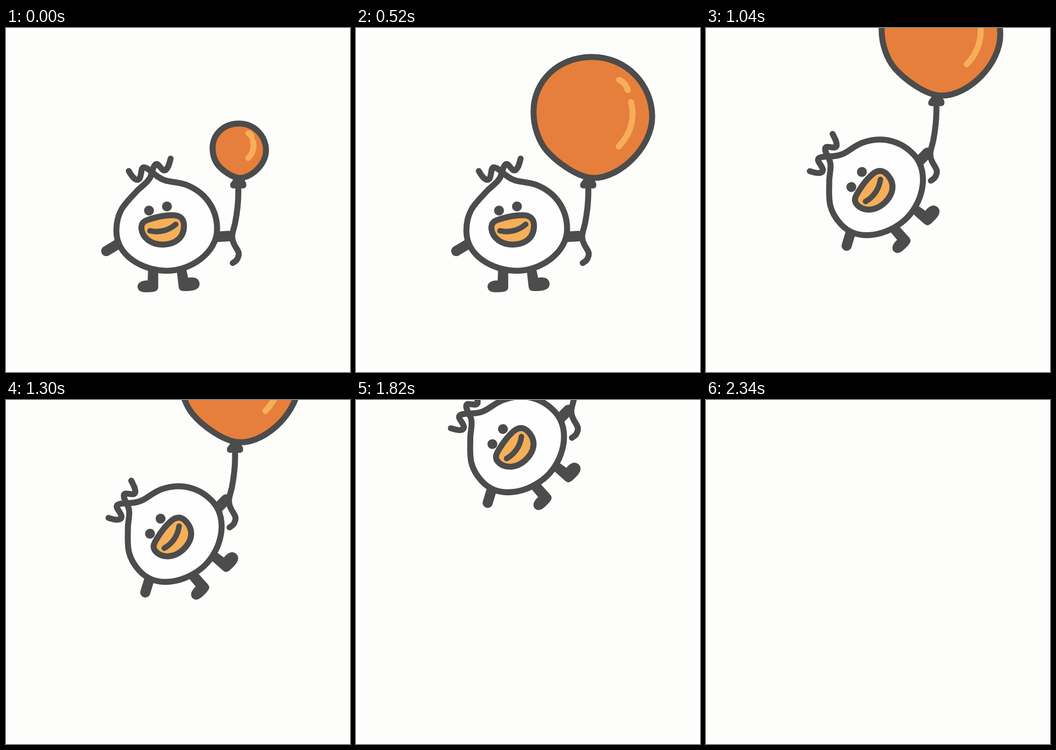
Recreate the animation shown at these times as an HTML page. Size 748x748 px, loop 2470 ms.

```html
<!DOCTYPE html>
<html>
<head>
<meta charset="utf-8">
<style>
  html, body { margin: 0; width: 100%; height: 100%; overflow: hidden; background: #fdfefc; }
  svg { display: block; width: 100%; height: 100%; }
  .line { fill: none; stroke: #4b4c4b; stroke-width: 13; stroke-linecap: round; stroke-linejoin: round; }
  .ink { fill: #4b4c4b; }
  .shine { stroke: #f6ae58; }
  .even { vector-effect: non-scaling-stroke; }
</style>
</head>
<body>
<svg viewBox="0 0 748 748">
  <g id="scene">
    <path id="balloon" class="line even" style="fill:#e67f3b" d="M513 63C590 63 644 125 644 193C644 258 575 326 517 326C480 326 432 287 414 266C397 245 386 215 386 182C386 115 440 63 513 63Z"/>
    <path id="shine" class="line shine even" d="M572 113Q585 117 591 135M598 161C607 195 598 230 571 258"/>
    <path class="ink" d="M497 320H516Q520 322 517 328L522 337Q525 349 514 349Q505 346 496 349Q485 349 488 338L495 328Z"/>
    <g id="body">
      <path id="arm" class="line" style="stroke-width:22" d="M243 470L218 485"/>
      <path class="ink" d="M450 443L484 441Q494 442 494 452Q494 464 484 464L450 466Z"/>
      <path class="ink" d="M309 525L308 549C290 549 286 557 286 563C287 575 300 575 310 574.5C325 574 331 572 331 562V525Z"/>
      <path class="ink" d="M371 525L375 560C376 571 380 572 390 572C405 572 421 570 421 556C420 543 408 541 396 543L392 525Z"/>
      <path class="line" style="fill:#fefefe" d="M267 311C275 325 283 334 290 328C296 318 292 304 300 303C312 304 325 325 345 331C360 336 372 334 392 341C440 360 459 400 459 437C459 490 400 528 350 528C300 528 240 497 240 441C240 395 262 380 286 353C300 340 313 332 316 318C319 308 322 294 329 296C338 303 340 312 347 309C354 303 355 294 358 284"/>
      <circle class="ink" cx="311" cy="397" r="10.7"/>
      <circle class="ink" cx="350" cy="388" r="10.7"/>
      <path class="line" style="fill:#f6ae58" d="M294.5 437C293 420 305 418 318 414C335 409 350 407 362 407C380 407 387 416 387 430C387 455 370 470 341 471C315 471 297 456 294.5 437Z"/>
      <path class="line" style="stroke-width:12" d="M313 441C335 446 355 439 369 427"/>
    </g>
    <path class="line" d="M505 345C506 375 503 400 498 425C493 445 490 450 493 462C497 478 510 485 505 497C503 505 498 508 493 511"/>
  </g>
</svg>
<script>
const STEP = 130, STEPS = 19;
const INFLATE = 4;               // steps until the balloon is full and lifts off
const TURN = 19.5, MAX_TURN = 42; // degrees per step, and at rest

// Height reached at a few steps: lift-off, a lull, then a steady climb away.
const climb = [[INFLATE, 0], [5, 33], [6, 93], [8, 179], [10, 234], [17, 575], [18, 760]];

const clamp = (v, low, high) => Math.min(high, Math.max(low, v));
const place = (id, transform) => document.getElementById(id).setAttribute('transform', transform);

function heightAt(step) {
  if (step <= INFLATE) return 0;
  const i = climb.findIndex(([at]) => at >= step);
  const [s0, h0] = climb[i - 1], [s1, h1] = climb[i];
  return h0 + (h1 - h0) * (step - s0) / (s1 - s0);
}

// Scale from a starting size to full size around a fixed point.
function grow(id, x, y, from, progress) {
  const size = from + (1 - from) * progress;
  place(id, `translate(${x} ${y}) scale(${size}) translate(${-x} ${-y})`);
}

function draw(time) {
  const step = Math.floor(time / STEP) % STEPS;
  const progress = clamp(step / INFLATE, 0, 1);
  const height = heightAt(step);
  const drift = height * height / 7800;
  const turn = clamp(TURN * (step - INFLATE - 1), 0, MAX_TURN);

  grow('balloon', 501, 326, 0.45, progress);
  grow('shine', 501, 297, 0.37, progress);
  place('scene', `translate(${-drift} ${-height})`);
  place('body', `rotate(${-turn} 482 449)`);
  place('arm', `rotate(${29 * Math.sin(Math.PI * progress)} 243 470)`);
}

const start = performance.now();
function tick() {
  draw(performance.now() - start);
  requestAnimationFrame(tick);
}
tick();
</script>
</body>
</html>
```
